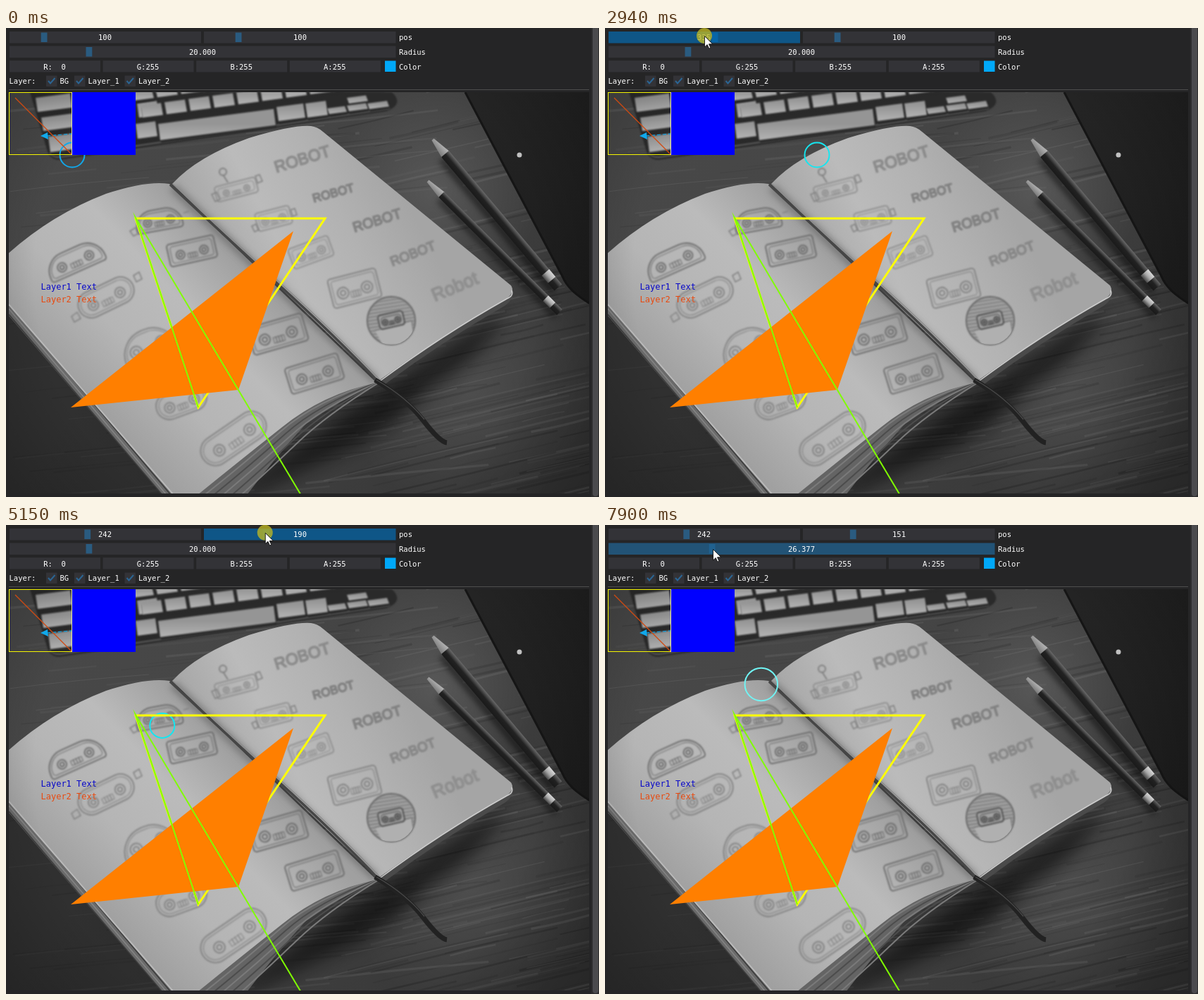
These frames come from a looping animation (842x665 px, 7990 ms). An HTML page with a canvas:

```html
<!DOCTYPE html>
<html lang="en">
<head>
<meta charset="utf-8">
<title>Drawing layers</title>
<style>
html, body { margin: 0; width: 100%; height: 100%; overflow: hidden; background: #252526; }
canvas { display: block; }
</style>
</head>
<body>
<canvas id="stage" width="842" height="665"></canvas>
<script>
const W = 842, H = 665, LOOP = 7990, STEP = 101.28;
const stage = document.getElementById('stage').getContext('2d');
const MONO = '"DejaVu Sans Mono", monospace';

let seed = 7;
const rnd = () => (seed = (seed * 16807) % 2147483647) / 2147483647;

// Value of a [step, value] track at step s
function at(track, s) {
  let a = track[0];
  for (const b of track) {
    if (b[0] > s) {
      if (s <= a[0]) return a[1];
      return a[1] + (b[1] - a[1]) * (s - a[0]) / (b[0] - a[0]);
    }
    a = b;
  }
  return a[1];
}

function poly(g, pts, fill, stroke, width = 1) {
  g.beginPath();
  pts.forEach(p => g.lineTo(p[0], p[1]));
  if (fill) { g.fillStyle = fill; g.fill(); }
  if (stroke) { g.strokeStyle = stroke; g.lineWidth = width; g.stroke(); }
}

function shape(g, d, fill, stroke, width = 1) {
  const p = new Path2D(d);
  if (fill) { g.fillStyle = fill; g.fill(p); }
  if (stroke) { g.strokeStyle = stroke; g.lineWidth = width; g.stroke(p); }
}

function blend(g, x0, y0, x1, y1, ...cols) {
  const f = g.createLinearGradient(x0, y0, x1, y1);
  cols.forEach((c, i) => f.addColorStop(i / (cols.length - 1), c));
  return f;
}

function box(g, x, y, w, h, fill) {
  g.fillStyle = fill;
  g.fillRect(x, y, w, h);
}

// ---------- photo ----------
function glow(g, x, y, r, light) {
  const f = g.createRadialGradient(x, y, 0, x, y, r);
  f.addColorStop(0, `rgba(255,255,255,${light})`);
  f.addColorStop(1, 'rgba(255,255,255,0)');
  box(g, x - r, y - r, r * 2, r * 2, f);
}

function drawWood(g) {
  box(g, 4, 91, 824, 569, blend(g, 40, 120, 760, 660, '#484848', '#464646', '#3e3e3e', '#353535'));
  glow(g, 610, 230, 150, .12);
  glow(g, 660, 510, 180, .1);
  for (let i = 0; i < 330; i++) {
    const x = rnd() * 824, y = 91 + rnd() * 640, len = 60 + rnd() * 220;
    const v = rnd() < .5 ? '0,0,0' : '150,150,150';
    const slope = x > 450 ? -.24 : -.1;
    g.beginPath();
    g.moveTo(x, y);
    g.quadraticCurveTo(x + len / 2, y + len * slope / 2 + rnd() * 6 - 3, x + len, y + len * slope);
    g.strokeStyle = `rgba(${v},${.05 + rnd() * .12})`;
    g.lineWidth = .8 + rnd() * 3;
    g.stroke();
  }
  shape(g, 'M4 400 L240 670 L0 670Z', 'rgba(20,20,20,.45)');
}

function key(g, x, y, w, h) {
  const d = w * -.13;
  poly(g, [[x + 2, y + 3], [x + w + 2, y + d + 3], [x + w + 4, y + d + h + 3], [x + 4, y + h + 4]], '#2a2a2a');
  poly(g, [[x, y], [x + w, y + d], [x + w + 3, y + d + h], [x + 3, y + h]],
    blend(g, x, y, x, y + h, '#959595', '#b4b4b4'));
}

function drawKeyboard(g) {
  g.filter = 'blur(1.2px)';
  shape(g, 'M34 91 L548 91 Q566 108 540 118 L76 187 Q62 187 58 172Z', '#2a2a2a');
  shape(g, 'M62 177 Q66 184 78 183 L545 114', null, '#5c5c5c', 2);
  key(g, 42, 99, 49, 20);
  key(g, 50, 127, 44, 19);
  key(g, 60, 154, 42, 22);
  key(g, 186, 107, 28, 20);
  key(g, 184, 136, 28, 21);
  key(g, 216, 136, 164, 23);
  for (let i = 0; i < 9; i++) {
    key(g, 191 + i * 34, 110 - i * 4.7, 29, 17);
    key(g, 178 + i * 34, 91 - i * 4.7, 29, 12);
  }
  key(g, 384, 112, 38, 20);
  key(g, 425, 107, 29, 20);
  key(g, 456, 114, 25, 8);
  key(g, 484, 99, 27, 8);
  key(g, 484, 110, 27, 8);
  key(g, 513, 107, 28, 8);
  g.filter = 'none';
}

function drawBook(g) {
  g.filter = 'blur(14px)';
  shape(g, 'M520 520 L712 396 Q680 470 600 510 Q560 560 500 590 L350 660 L320 660Z', 'rgba(5,5,5,.65)');
  g.filter = 'none';
  // page stacks and covers
  shape(g, 'M4 370 L4 408 L222 662 L262 662Z', '#6a6a6a');
  for (let i = 0; i < 4; i++)
    poly(g, [[4, 382 + i * 8], [240 - i * 6, 662]], null, i % 2 ? '#3c3c3c' : '#858585', 1.5);
  shape(g, 'M528 503 Q470 530 425 562 Q380 612 342 662 L250 662 L330 570 L500 500Z', '#646464');
  for (let i = 0; i < 5; i++)
    shape(g, `M527 ${502 + i * .6} Q${440 + i * 4} ${528 + i * 5} ${390 + i * 6} ${572 + i * 4} T${282 + i * 13} 662`,
      null, i % 2 ? '#4c4c4c' : '#7a7a7a', 2);
  shape(g, 'M720 372 Q722 384 708 394 Q620 444 534 508 L524 500 L700 370Z', '#4a4a4a');
  // pages
  shape(g, 'M4 319 Q66 264 142 235 Q200 216 232 221 L526 503 Q450 519 392 566 Q330 615 272 662 L238 662 L4 392Z',
    blend(g, 90, 500, 300, 300, '#a0a0a0', '#b5b5b5', '#bbbbbb', '#a0a0a0'));
  shape(g, 'M4 392 L238 662', null, '#bababa', 2);
  shape(g, 'M236 221 Q272 182 345 156 Q408 137 433 139 Q442 140 450 147 L717 365 Q723 374 711 384 Q618 436 528 501Z',
    blend(g, 290, 320, 540, 190, '#a6a6a6', '#bbbbbb', '#b2b2b2', '#a5a5a5'));
  shape(g, 'M718 372 Q721 380 711 384 Q618 436 529 502', null, '#cdcdcd', 1.5);
  g.filter = 'blur(5px)';
  shape(g, 'M237 226 L526 500', null, 'rgba(55,55,55,.35)', 13);
  g.filter = 'none';
  shape(g, 'M233 222 Q300 285 385 362 T529 502', null, '#464646', 3.5);
  shape(g, 'M237 221 Q304 284 389 361 T532 500', null, '#8c8c8c', 1.3);
  shape(g, 'M524 499 Q568 525 592 556 T626 588', null, '#222', 7);
  shape(g, 'M526 499 Q568 523 594 555', null, '#4a4a4a', 1.2);
}

// kind: 0 box, 1 dome, 2 capsule
function robot(g, x, y, w, h, turn, kind, tone) {
  g.save();
  g.translate(x, y);
  g.rotate(turn);
  g.strokeStyle = tone;
  for (const k of [0, 4]) {
    const a = w / 2 - k, b = h / 2 - k;
    g.beginPath();
    g.roundRect(-a, -b, a * 2, b * 2, kind === 1 ? [b * 1.6, b * 1.6, 4, 4] : kind === 2 ? b : 4);
    g.lineWidth = k ? 1 : 1.8;
    g.stroke();
  }
  const r = h * .19;
  for (const s of [-1, 1]) {
    for (const q of [r, r * .45]) {
      g.beginPath();
      g.arc(s * w * .25, h * .06, q, 0, 7);
      g.lineWidth = 1.8;
      g.stroke();
    }
  }
  g.lineWidth = 1;
  g.strokeRect(-w * .1, h * .08, w * .2, h * .2);
  for (let i = -1; i < 2; i++) g.strokeRect(i * w * .05, h * .08, .3, h * .2);
  g.restore();
}

function drawSketches(g) {
  const dark = '#686868', mid = '#808080', pale = '#8e8e8e';
  g.filter = 'blur(.8px)';
  [[98, 329, 84, 34, -.42, 1, dark], [217, 272, 66, 30, -.18, 1, dark], [264, 316, 68, 32, -.22, 0, dark],
   [142, 382, 84, 38, -.45, 2, mid], [202, 450, 78, 46, -.4, 1, mid], [386, 434, 80, 40, -.28, 0, dark],
   [438, 490, 78, 38, -.3, 0, dark], [249, 530, 74, 38, -.35, 2, mid], [323, 582, 104, 42, -.6, 2, mid],
   [327, 229, 60, 22, -.25, 0, pale], [380, 270, 50, 26, -.25, 0, pale], [433, 318, 60, 30, -.35, 0, pale],
   [495, 369, 70, 42, -.25, 0, mid]].forEach(r => robot(g, ...r));
  shape(g, 'M315 219 L308 208 M313 204 A5 5 0 1 0 303 204 A5 5 0 1 0 313 204', null, mid, 2);
  shape(g, 'M176 288 l8 -5 5 8 -8 4Z M252 262 l8 -2 M93 409 l8 -6 5 9 -9 5Z M181 351 l8 -5 4 10 -8 4Z'
    + 'M292 236 l7 -3 5 10 -7 3Z M354 210 l6 -2 4 9 -7 3Z M349 281 l6 -3 4 8 -6 3Z M404 258 l6 -2 3 9 -6 2Z', null, mid, 1.5);
  // hatched badge
  g.save();
  g.beginPath();
  g.arc(547, 415, 34, 0, 7);
  g.fillStyle = '#a0a0a0';
  g.fill();
  g.strokeStyle = '#666';
  g.lineWidth = 2;
  g.stroke();
  g.clip();
  for (let i = 0; i < 20; i++) shape(g, `M505 ${372 + i * 5} l90 -14`, null, '#787878', 1.3);
  poly(g, [[524, 429], [576, 415], [582, 450], [535, 450]], '#b0b0b0', '#666');
  g.restore();
  poly(g, [[527, 409], [562, 401], [566, 421], [531, 428]], '#a0a0a0');
  robot(g, 547, 414, 36, 20, -.22, 0, '#4c4c4c');
  // lettering
  g.textAlign = 'center';
  g.textBaseline = 'middle';
  [['ROBOT', 421, 187, -.3, 23, '#868686'], ['ROBOT', 465, 235, -.27, 17, '#7c7c7c'], ['ROBOT', 527, 274, -.3, 20, '#7c7c7c'],
   ['ROBOT', 578, 321, -.37, 19, '#848484'], ['Robot', 638, 368, -.4, 26, '#8c8c8c']].forEach(([s, x, y, turn, px, c]) => {
    g.save();
    g.translate(x, y);
    g.rotate(turn);
    g.font = `${px}px "Liberation Sans", sans-serif`;
    g.fillStyle = g.strokeStyle = c;
    g.lineWidth = 1;
    g.fillText(s, 0, 0);
    g.strokeText(s, 0, 0);
    g.restore();
  });
  g.filter = 'none';
}

function pencil(g, x, y, x2, y2, w) {
  const a = Math.atan2(y2 - y, x2 - x), n = Math.hypot(x2 - x, y2 - y);
  g.save();
  g.translate(x, y);
  g.rotate(a);
  g.filter = 'blur(4px)';
  box(g, 30, 4, n - 30, w * .7, 'rgba(0,0,0,.5)');
  g.filter = 'blur(.7px)';
  poly(g, [[0, -2], [28, -w / 2], [28, w / 2], [0, 2]], blend(g, 0, -w / 2, 0, w / 2, '#b8b8b8', '#777'));
  box(g, 27, -w / 2, n - 27, w, blend(g, 0, -w / 2, 0, w / 2, '#6a6a6a', '#222', '#1a1a1a'));
  box(g, n - 28, -w / 2, 14, w, blend(g, 0, -w / 2, 0, w / 2, '#ddd', '#aaa', '#444'));
  g.filter = 'none';
  g.restore();
}

function makePhoto() {
  const c = document.createElement('canvas');
  c.width = W;
  c.height = H;
  const g = c.getContext('2d');
  g.beginPath();
  g.rect(4, 91, 824, 569);
  g.clip();
  drawWood(g);
  shape(g, 'M652 91 L828 91 L828 392 L806 376 Q798 370 790 352Z', blend(g, 700, 100, 820, 380, '#242424', '#202020', '#1b1b1b'));
  shape(g, 'M652 91 L790 352 Q798 372 828 390', null, '#151515', 3);
  drawKeyboard(g);
  drawBook(g);
  drawSketches(g);
  pencil(g, 606, 158, 784, 368, 14);
  pencil(g, 599, 217, 786, 403, 11);
  g.beginPath();
  g.arc(729, 180, 3.5, 0, 7);
  g.fillStyle = '#c4c4c4';
  g.fill();
  const v = g.createRadialGradient(400, 350, 360, 400, 350, 560);
  v.addColorStop(0, 'rgba(0,0,0,0)');
  v.addColorStop(1, 'rgba(0,0,0,.32)');
  box(g, 4, 91, 824, 569, v);
  return c;
}
const photo = makePhoto();

// ---------- motion, in steps ----------
const curX = [[1, 786], [8, 454], [9, 400], [13, 72], [14, 72], [15, 64], [17, 53], [20, 54], [21, 58], [25, 151],
  [27, 154], [28, 156], [29, 141], [32, 116], [35, 118], [38, 320], [40, 333], [41, 337], [42, 360], [46, 403], [47, 403],
  [51, 356], [53, 352], [57, 172], [59, 160], [61, 120], [62, 118], [66, 130], [67, 144], [68, 190], [69, 238],
  [72, 238], [76, 153]];
const curY = [[1, 648], [8, 339], [9, 292], [13, 1], [14, 1], [15, 7], [17, 12], [29, 11], [41, 10], [53, 11],
  [57, 39], [60, 34]];
const posX = [[20, 100], [21, 110], [26, 325], [28, 330], [29, 335], [30, 300], [33, 242]];
const posY = [[40, 100], [41, 107], [42, 148], [43, 190], [46, 269], [47, 269], [51, 163], [53, 151]];
const radius = [[62, 20], [66, 21.9], [67, 23.8], [68, 30.037], [69, 42.237], [72, 42.237], [76, 26.377]];

const sliders = [
  { x: 5, y: 5, w: 272, h: 16.5, k: .434, mid: 140.5, track: posX, dp: 0, from: 20, to: 33 },
  { x: 281, y: 5, w: 272.5, h: 16.5, k: .434, mid: 417.5, track: posY, dp: 0, from: 40, to: 53 },
  { x: 5, y: 25.5, w: 548.5, h: 16.5, k: 5.36, mid: 279, track: radius, dp: 3, from: 62, to: 77 }
];

// ---------- interface ----------
function label(g, s, x, y, align = 'left', color = '#fff', px = 10.5) {
  g.font = `${px}px ${MONO}`;
  g.textAlign = align;
  g.textBaseline = 'alphabetic';
  g.fillStyle = color;
  g.fillText(s, x, y);
}

function drawSlider(g, o, s, x, y) {
  const on = s >= o.from && s < o.to, busy = sliders.some(q => s >= q.from && s < q.to);
  const over = !busy && x >= o.x && x < o.x + o.w && y >= o.y && y < o.y + o.h;
  const v = at(o.track, s);
  box(g, o.x, o.y, o.w, o.h, on ? '#0f5687' : over ? '#225376' : '#333337');
  box(g, o.x + 1.3 + v * o.k, o.y + 1.5, 8.8, o.h - 3,
    on ? 'rgba(0,119,200,.5)' : over ? 'rgba(29,130,200,.3)' : '#2a5b80');
  label(g, v.toFixed(o.dp), o.mid, o.y + 12.3, 'center');
}

function drawPanel(g, s, x, y) {
  sliders.forEach(o => drawSlider(g, o, s, x, y));
  ['R:  0', 'G:255', 'B:255', 'A:255'].forEach((t, i) => {
    box(g, 5 + i * 132.6, 46.2, 129, 16.3, '#333337');
    label(g, t, 69 + i * 132.6, 58.5, 'center');
  });
  box(g, 538, 46.5, 15.5, 15.5, '#00a8f8');
  ['pos', 'Radius', 'Color'].forEach((t, i) => label(g, t, 558, 17.3 + i * 20.6));
  label(g, 'Layer:', 4.5, 79.3);
  [[57, 'BG'], [97, 'Layer_1'], [168.5, 'Layer_2']].forEach(([bx, t]) => {
    box(g, bx, 67.5, 15.5, 15.5, '#333337');
    poly(g, [[bx + 3, 75], [bx + 6, 78.5], [bx + 12.5, 71]], null, '#2b6593', 2);
    label(g, t, bx + 19.5, 79.3);
  });
  box(g, 4, 87, 824, 1, '#4e4e4e');
  box(g, 831, 0, 11, H, '#2d2d2d');
  g.beginPath();
  g.roundRect(833, -4, 8, H + 3, 4);
  g.fillStyle = '#4b4b4d';
  g.fill();
}

function drawLayers(g, s) {
  g.save();
  g.beginPath();
  g.rect(4, 90, 824, 570);
  g.clip();
  g.beginPath();
  g.arc(4 + at(posX, s - 1) * .9, 90 + at(posY, s - 1) * .9, at(radius, s - 1) * .9 - .5, 0, 7);
  g.strokeStyle = s < 21 ? '#11a8ea' : s > 76 ? '#70f4f4' : '#14e6f0';
  g.lineWidth = 2;
  g.stroke();
  g.setLineDash([5, 3]);
  poly(g, [[58, 153], [94, 150]], null, '#11a8ea', 1.2);
  g.setLineDash([]);
  poly(g, [[49, 153], [59, 148], [60, 158]], '#11a8ea');
  poly(g, [[13, 99], [94, 180]], null, '#d04a10', 1.2);
  box(g, 94, 91, 90, 89, '#0000ff');
  g.strokeStyle = '#f4f400';
  g.lineWidth = 1;
  g.strokeRect(4.5, 91.5, 89, 88);
  box(g, 93, 91, 1, 89, '#e8e8a0');
  poly(g, [[184, 270], [453, 270], [273, 538], [184, 270], [453, 270]], null, '#ffff00', 3);
  poly(g, [[92, 538], [408, 288], [330, 513]], '#ff7f00');
  poly(g, [[273, 538], [184, 269], [420, 664]], null, '#80ff00', 2);
  label(g, 'Layer1 Text', 49.5, 371, 'left', '#0808c8', 12);
  label(g, 'Layer2 Text', 49.5, 389, 'left', '#e84a10', 12);
  g.restore();
}

function drawCursor(g, s, x, y) {
  if (s < 1) return;
  if (sliders.some(o => s >= o.from && s < o.to)) {
    g.beginPath();
    g.arc(x, y, 11, 0, 7);
    g.fillStyle = 'rgba(190,182,35,.78)';
    g.fill();
  }
  g.save();
  g.translate(x, y);
  shape(g, 'M.5 .5 V16 L4.2 12.6 L6.8 18.2 L9 17.2 L6.5 11.8 H11.8Z', '#fff', '#111', .9);
  g.restore();
}

const start = performance.now();
function frame(now) {
  const t = Math.max(0, now - start) % LOOP;
  const s = Math.min(78, Math.floor((t + 14) / STEP));
  const x = at(curX, s), y = at(curY, s);
  box(stage, 0, 0, W, H, '#252526');
  stage.drawImage(photo, 0, 0);
  drawLayers(stage, s);
  drawPanel(stage, s, x, y);
  drawCursor(stage, s, x, y);
  requestAnimationFrame(frame);
}
frame(start);
</script>
</body>
</html>
```
